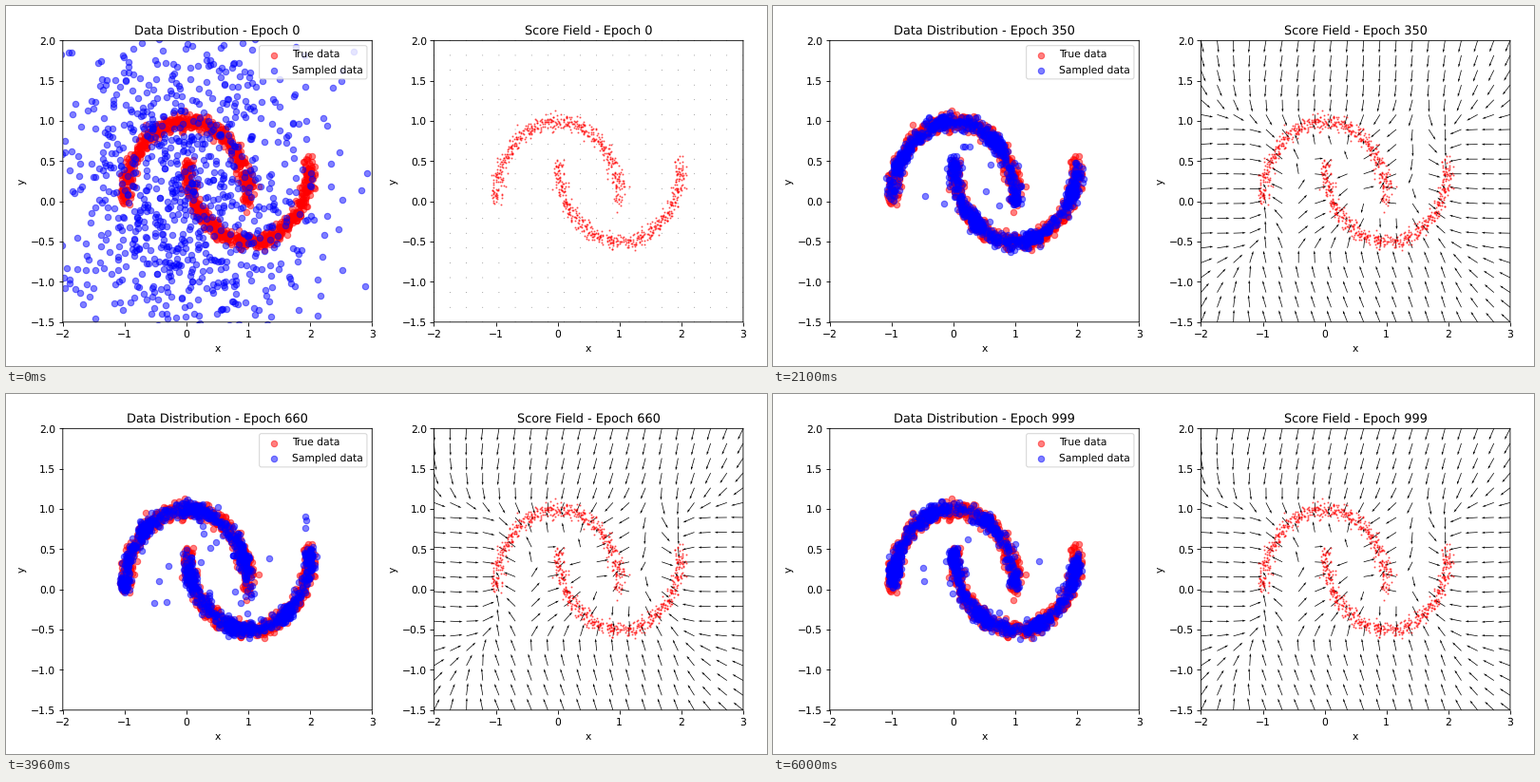
These frames come from a looping animation (801x379 px, 6060 ms). A matplotlib script:

```python
import numpy as np
import matplotlib.pyplot as plt
from matplotlib.animation import FuncAnimation

W, H, DPI = 801, 379, 77
FRAMES, STEP = 101, 60
N = 1000

# Soft, unsnapped edges and evenly spaced letters
plt.rcParams.update({"path.snap": False, "text.hinting": "none"})

# How the sampler drifts while the model is being trained
KEYS = [0, 12, 19, 27, 35, 50, 56, 60, 66, 80, 100]
UPPER = [1, 1.3, 1.6, 1.2, 1, .75, .42, .7, 1.1, 1, 1.35]
LOWER = [1, 1, 1.05, 1, 1, .85, .5, .85, 1, 1, 1.15]
SHIFT = [0, 0, -.01, 0, 0, .02, .06, .03, 0, 0, 0]
STRAY = [0, .05, .02, .02, .012, .02, .03, .03, .025, .012, .012]
LIFT = [0, 0, 0, 0, 0, 0, 30, 8, 3, 0, 0]


def key(values, k):
    return np.interp(k, KEYS, values)


def upper_moon(t):
    return np.column_stack([np.cos(t), np.sin(t)])


def lower_moon(t):
    return np.column_stack([1 - np.cos(t), .5 - np.sin(t)])


def make_moons(n, noise, seed):
    rng = np.random.RandomState(seed)
    t = np.linspace(0, np.pi, n // 2)
    pts = np.vstack([upper_moon(t), lower_moon(t)])
    order = np.arange(n)
    rng.shuffle(order)
    return pts[order] + rng.normal(scale=noise, size=pts.shape)


def clump(u, rng):
    """Bunch the points unevenly along an arc."""
    return np.clip(u + .035 * np.sin(21 * u + rng.uniform(0, 6.28)), .01, .98)


def sample(k):
    rng = np.random.RandomState(100 + k)
    blob = rng.normal(size=(N, 2)) * [1.12, 1.12] + [-.05, .2]
    if k == 0:
        return blob
    half = N // 2
    p, q = key(UPPER, k), key(LOWER, k)
    up = upper_moon(np.pi * clump(1 - rng.rand(half) ** p, rng))
    low = lower_moon(np.pi * clump(rng.rand(half) ** q, rng))

    # A few points are still on the way between the two arcs
    stray = rng.rand(half) < 2 * key(STRAY, k)
    mix = rng.uniform(.15, .75, (half, 1))
    up[stray] = (up * (1 - mix) + low[::-1] * mix)[stray]
    lift = int(key(LIFT, k))
    low[:lift] = [1.93, .85]

    pts = np.vstack([up, low])
    pts += rng.normal(scale=.048, size=pts.shape)
    pts[:, 0] += key(SHIFT, k)
    spread = np.exp(-(k / 4) ** 1.3)
    return rng.permutation((1 - spread) * pts + spread * blob)


def unit(vec):
    return vec / (np.hypot(*vec.T)[:, None] + 1e-9)


def score(k):
    """Pull towards the arcs nearby, towards their bounding box far away."""
    early = np.exp(-k / 30)
    sigma = .2 + 1.2 * np.exp(-k / 5)
    diff = anchors[None] - grid[:, None]
    d2 = (diff ** 2).sum(2)
    w = np.exp(-(d2 - d2.min(1, keepdims=True)) / (2 * sigma ** 2))
    near = (w[..., None] * diff).sum(1) / w.sum(1)[:, None]
    size = np.hypot(*near.T)

    far = np.clip(grid, [-1, -.5], [2, 1]) - grid
    away = np.tanh(np.hypot(*far.T) / .3)[:, None]
    above = far[:, 1] < 0
    squeeze = np.where(above, .3, np.where(far[:, 1] > 0, .8, 1))
    drift = np.where(above, .22 * (1 - early), .3 + .3 * early)
    far[:, 0] = far[:, 0] * squeeze - drift * np.abs(far[:, 1])
    u, v = unit(unit(far) * away + unit(near) * (1 - away)).T

    turn = .05 * np.sin(.9 * k + 2 * grid[:, 0]) + .04 * np.sin(1.7 * k - grid[:, 1])
    c, s = np.cos(turn), np.sin(turn)
    mag = np.tanh(size / .1) * (.01 + .99 * (1 - np.exp(-k / 3)))
    return mag * (c * u - s * v), mag * (s * u + c * v)


def style(ax):
    ax.set_xlim(-2, 3)
    ax.set_ylim(-1.5, 2)
    ax.set_xlabel("x")
    ax.set_ylabel("y")


moons = make_moons(N, .05, 0)
anchors = moons[:300]
gx, gy = np.meshgrid(np.linspace(-2, 3, 20), np.linspace(-1.5, 2, 20))
grid = np.column_stack([gx.ravel(), gy.ravel()])

fig = plt.figure(figsize=((W + 1e-4) / DPI, (H + 1e-4) / DPI), dpi=DPI)
AX_W, AX_H, BOTTOM = 325.5, 296.45, 46.2
left, right = [fig.add_axes([x / W, BOTTOM / H, AX_W / W, AX_H / H])
               for x in (59.8, 450.4)]
style(left)
style(right)

left.scatter(*moons.T, color="red", alpha=.5, label="True data")
dots = left.scatter(*sample(0).T, color="blue", alpha=.5, label="Sampled data")
left.legend(loc="upper right")
field = right.quiver(gx, gy, *score(0), color="black", scale=25, width=.0022)
right.scatter(*moons.T, s=1, color="red", alpha=.5)


def update(k):
    epoch = min(10 * k, 999)
    dots.set_offsets(sample(k))
    field.set_UVC(*score(k))
    left.set_title(f"Data Distribution - Epoch {epoch}")
    right.set_title(f"Score Field - Epoch {epoch}")
    return dots, field


anim = FuncAnimation(fig, update, frames=FRAMES, interval=STEP,
                     repeat=True, repeat_delay=0, blit=False)
plt.show()
```
